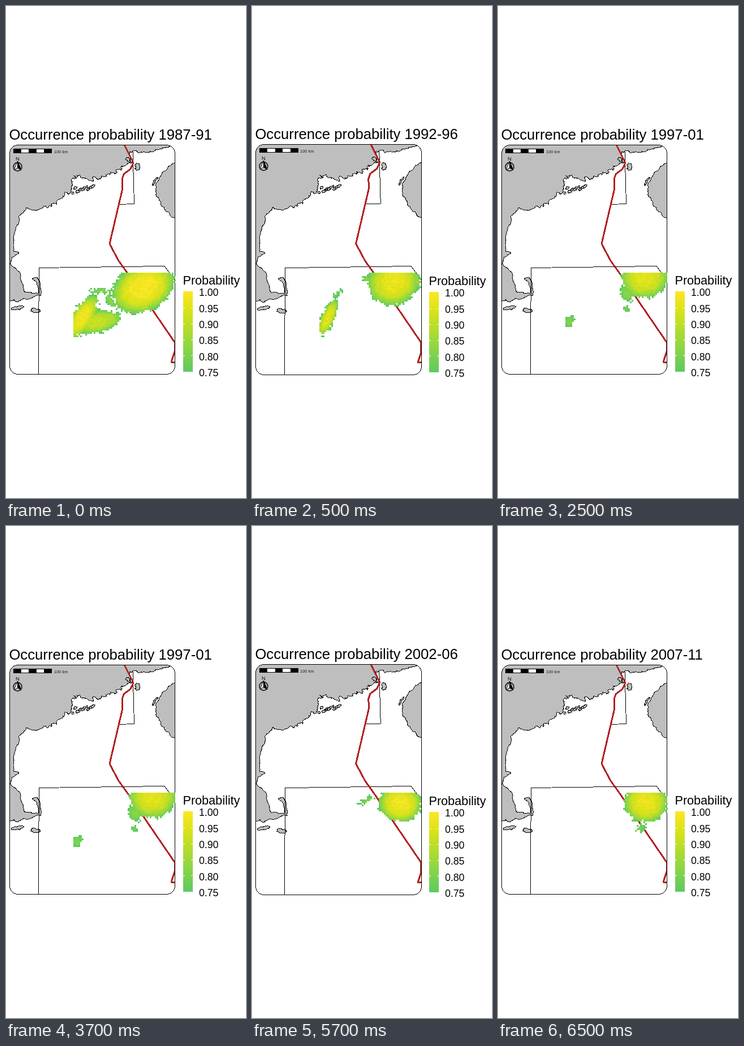
An HTML page for the animation above (8000 ms loop, 424x869 px).

```html
<!DOCTYPE html>
<html lang="en">
<head>
<meta charset="utf-8">
<title>Occurrence probability</title>
<style>
  html, body { margin: 0; height: 100%; overflow: hidden; background: #fff; }
  svg { display: block; font-family: "Liberation Sans", Arial, sans-serif; }
  .crisp { shape-rendering: crispEdges; }
  .land { fill: #bebebe; stroke: #000; }
  .line { fill: none; stroke: #000; }
</style>
</head>
<body>
<svg id="stage" width="424" height="869" viewBox="0 0 424 869"></svg>
<script>
const stage = document.getElementById('stage');
const CELL = 3, LEFT = 119, TOP = 471;
const PALETTE = [[94, 201, 98], [132, 212, 75], [173, 220, 48], [216, 226, 25], [253, 231, 37]];

// Patches are tilted ellipses: centre x, y, radii, angle, peak.
const PERIODS = [
  { label: '1987-91', patches: [
    [243, 497, 58, 42, -0.5, 0.9], [135, 550, 44, 19, -1, 0.85], [160, 558, 44, 19, -0.2, 0.6],
    [168, 503, 23, 4, -0.1, 0.2], [185, 521, 15, 6, 0.9, 0.2]] },
  { label: '1992-96', patches: [
    [250, 487, 46, 41, -0.4, 0.8], [203, 482, 11, 4, 0.2, 0.2], [293, 487, 4, 12, -0.3, 0.3],
    [134, 551, 36, 12, -1.15, 0.75], [149, 509, 8, 3, -0.5, 0.1]] },
  { label: '1997-01', patches: [
    [259, 478, 42, 38, -0.2, 0.75], [230, 505, 13, 16, 0.4, 0.2], [126, 557, 9, 8, -0.5, 0.15],
    [227, 534, 5, 4, 0, 0.1]] },
  { label: '2002-06', patches: [
    [262, 490, 38, 33, 0.1, 0.85], [206, 484, 14, 4, -0.3, 0.15]] },
  { label: '2007-11', patches: [
    [261, 488, 39, 36, 0, 0.8], [249, 534, 9, 6, -0.4, 0.1]] }
];

const MAINLAND = '305,236 292,247 262,256 234,260 228,255 221,268 225,276 204,290 184,293 168,301 152,310 138,303 131,300 119,299 116,320 92,342 66,354 36,356 23,371 22,385 14,405 13,433 23,437 11,443 10,459 24,470 31,496 34,506 58,506 55,491 46,482 52,479 60,488 62,511 33,517 18,523 14,518 -5,526 -5,236';
const PENINSULA = '305,270 279,292 267,311 265,336 274,352 290,370 305,380';
const ROUTE = '209,245 225,277 220,288 208,297 205,306 206,322 183,420 199,450 214,471 298,594 298,610 292,629 300,629';
const LIMITS = ['57,652 58.5,462.5 280,459.5 300,486', '224,256 226.5,349.5 199,350.5'];
const ISLES = [[20, 533, 12, 3, -0.2], [52, 538, 9, 4, 0.1], [232, 284, 5, 7, 0], [263, 310, 9, 1.5, -1], [215, 271, 4, 3, 1]];

const hash = (a, b) => { const s = Math.sin(a * 127.1 + b * 311.7) * 43758.5453; return s - Math.floor(s); };
const parse = s => s.split(' ').map(p => p.split(',').map(Number));

// Closed outline roughened by midpoint displacement.
function shore(pts) {
  const out = [];
  const split = (a, b) => {
    const dx = b[0] - a[0], dy = b[1] - a[1], len = Math.hypot(dx, dy);
    if (len < 2.5) return out.push(b);
    const jagged = a[0] > 60 && a[0] < 230 && a[1] < 356;
    const k = (hash(a[0] + b[1], a[1] + b[0]) - 0.5) * Math.min(jagged ? 1 : 0.4, (jagged ? 15 : 4) / len);
    const mid = [(a[0] + b[0]) / 2 + dy * k, (a[1] + b[1]) / 2 - dx * k];
    split(a, mid);
    split(mid, b);
  };
  pts.forEach((p, i) => split(p, pts[(i + 1) % pts.length]));
  return `<polygon class="land" points="${out.map(p => p.map(v => v.toFixed(1))).join(' ')}"/>`;
}

function isle([x, y, rx, ry, angle]) {
  const pts = Array.from({ length: 7 }, (_, i) => {
    const a = i * Math.PI * 2 / 7, u = rx * Math.cos(a), v = ry * Math.sin(a);
    return [x + u * Math.cos(angle) - v * Math.sin(angle), y + u * Math.sin(angle) + v * Math.cos(angle)];
  });
  return shore(pts);
}

// Small islets scattered in the bay.
for (let i = 0; i < 9; i++) {
  ISLES.push([118 + i * 4.5, 327 - i * 1.5 + hash(i, 1) * 10 - 5, 2 + hash(i, 2) * 3, 1.5 + hash(i, 3), -0.6]);
}

const line = (pts, style = '') => `<polyline class="line" points="${pts}" ${style}/>`;
const text = (s, x, y, size, color = '#000') =>
  `<text x="${x}" y="${y}" font-size="${size}" fill="${color}">${s}</text>`;
const rect = (x, y, w, h, fill, more = '') =>
  `<rect x="${x}" y="${y}" width="${w}" height="${h}" fill="${fill}" ${more}/>`;

const MAP = shore(parse(MAINLAND)) + shore(parse(PENINSULA)) + ISLES.map(isle).join('') +
  LIMITS.map(l => line(l)).join('') +
  line(ROUTE, 'style="stroke:#b22222;stroke-width:3;stroke-linejoin:round"');

function shade(v) {
  const f = Math.max(0, Math.min(0.999, v)) * 4, i = Math.floor(f);
  return `rgb(${PALETTE[i].map((c, k) => Math.round(c + (PALETTE[i + 1][k] - c) * (f - i)))})`;
}

function raster(patches) {
  let out = '';
  for (let j = 0; j < 40; j++) for (let i = 0; i < 60; i++) {
    const x = LEFT + (i + 0.5) * CELL, y = TOP + (j + 0.5) * CELL, grain = hash(i, j) - 0.5;
    let best = -1;
    for (const [cx, cy, rx, ry, angle, peak] of patches) {
      const c = Math.cos(angle), s = Math.sin(angle), dx = x - cx, dy = y - cy;
      const e = Math.hypot((dx * c + dy * s) / rx, (dy * c - dx * s) / ry);
      const wave = Math.sin(x * 0.21 + y * 0.13) + Math.sin(y * 0.33 - x * 0.1);
      const edge = (e - 1) * Math.min(rx, ry) + grain * 5 + wave * 1.2;
      if (edge < 0) best = Math.max(best, peak * (1 - e ** 3) + 0.03 * Math.sin(e * 22 + wave));
    }
    if (best > -1) out += rect(LEFT + i * CELL, TOP + j * CELL, CELL, CELL, shade(best + 0.06 + grain * 0.14));
  }
  return out;
}

function scaleAndNorth(odd) {
  const y = 252 - odd, w = 68 + odd;
  let out = rect(13, y, w, 8, '#000');
  for (const i of [1, 3]) out += rect(13 + i * w / 5, y + 1, w / 5, 6, '#fff');
  return `<g class="crisp">${out}</g>` + text('100 km', 85, 260 - odd, 7.5, '#123') +
    text('N', 17, 273 - odd, 9.5, '#112') +
    `<g transform="translate(20.5 ${274 - odd})" stroke="#000">
      <circle cy="10" r="7.5" fill="none" stroke-width="1.4"/>
      <path d="M0 0L-6.5 15.5L0 12Z" fill="#fff"/><path d="M0 0L6.5 15.5L0 12Z"/></g>`;
}

function legend(y) {
  const stops = PALETTE.map((c, i) => `<stop offset="${1 - i / 4}" stop-color="rgb(${c})"/>`).reverse().join('');
  let out = `<linearGradient id="ramp" x2="0" y2="1">${stops}</linearGradient>` +
    text('Probability', 312.5, y - 12, 21.6) + rect(313, y, 17, 142, 'url(#ramp)');
  for (let i = 0; i < 6; i++) {
    const ty = Math.round(y + 0.5 + i * 28.2);
    if (i % 5) out += rect(313, ty, 3, 1, '#fff') + rect(327, ty, 3, 1, '#fff');
    out += text((1 - i * 0.05).toFixed(2), 341, Math.round(y + 8.4 + i * 28.3), 17.6);
  }
  return out;
}

function draw(index) {
  const odd = index % 2, { label, patches } = PERIODS[index];
  const w = 292 + odd, h = 405 + odd * 2, y = 245.5 - odd;
  const panel = `x="6.5" y="${y}" width="${w}" height="${h}" rx="15"`;
  stage.innerHTML = text('Occurrence probability ' + label, 5.4, 236 - odd, 25.7) +
    `<clipPath id="panel"><rect ${panel}/></clipPath>
    <g class="crisp">
      <g clip-path="url(#panel)">
        <g transform="translate(6 ${y}) scale(${w / 292} ${h / 405}) translate(-6 -245.5)">${MAP}</g>
      </g>
      <rect class="line" ${panel}/>
      ${raster(patches)}
    </g>` + scaleAndNorth(odd) + legend(504 + odd);
}

let shown = -1;
const start = performance.now();
function tick() {
  const t = (performance.now() - start) % 8000;
  const index = Math.floor((t + 1500) / 2000);
  if (index !== shown) draw(shown = index);
  requestAnimationFrame(tick);
}
tick();
</script>
</body>
</html>
```
